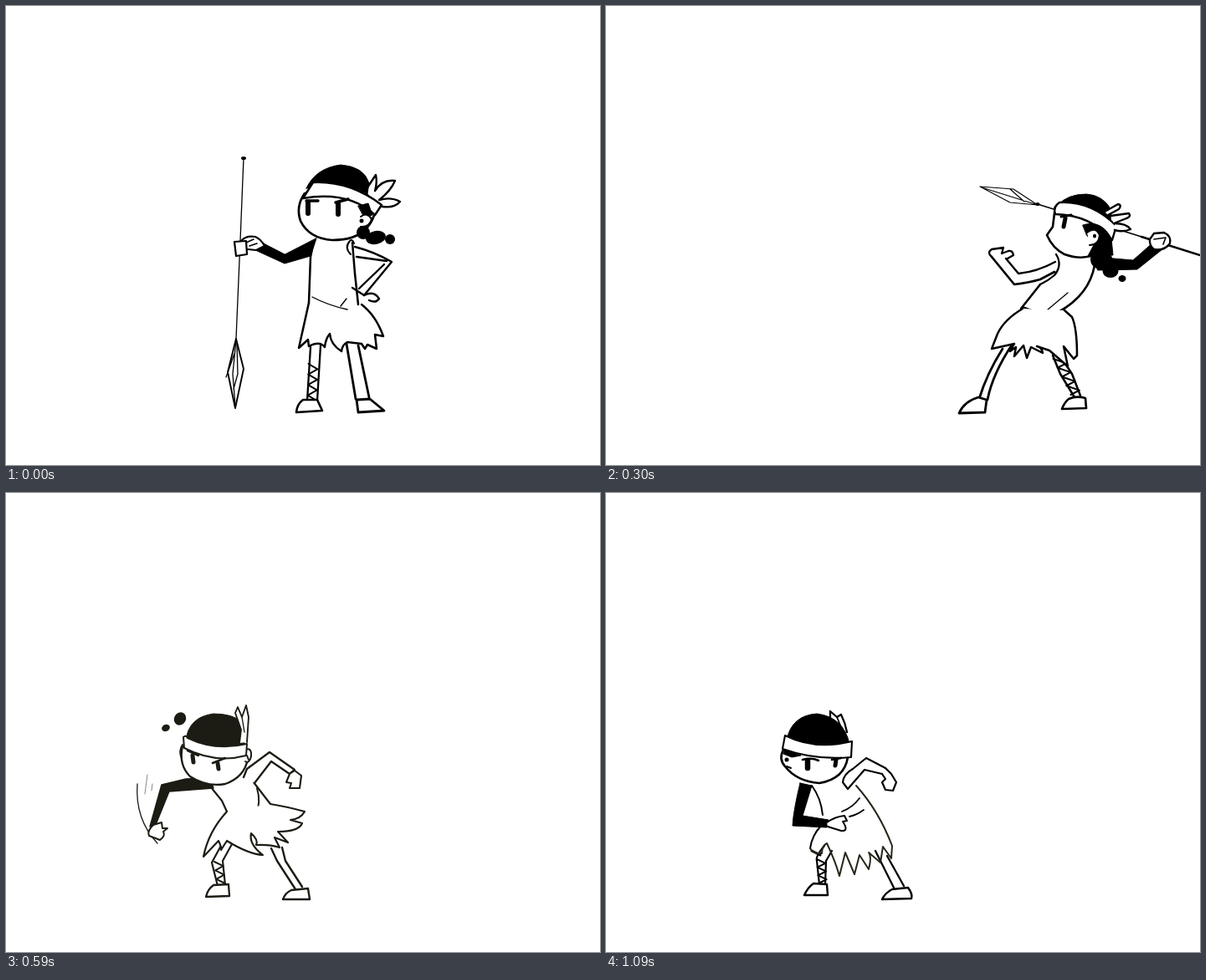
These frames come from a looping animation (710x549 px, 1.19 s). An HTML page with a canvas:

```html
<!DOCTYPE html>
<html lang="en">
<head>
<meta charset="utf-8">
<title>Spear throw</title>
<style>
html, body { margin: 0; width: 100%; height: 100%; overflow: hidden; background: #fff; }
canvas { display: block; }
</style>
</head>
<body>
<canvas id="stage" width="710" height="549"></canvas>
<script>
// Each line is "style data". Style is a line width plus w (white fill), k (ink fill),
// s (soft grey line) or g (olive line); o = ink ellipse, z = zigzag leg wrap.
const parts = {
  spear0: `1.3 M284 182L280 281L275 398
    o 284 182 3 2
    1.9 M275 398L265 438L274 481L284 434Z
    1.3 M275 400L271 440L274 478M263 444L273 416M276 404L277 440L272 458`,
  arm0: `1k M371 278L364 299L333 308L296 291L304 282L333 297Z
    2.2w M281 281Q287 274 298 276Q305 279 309 287L299 292L289 291
    2.2w M273 282L275 299L288 297L287 281Z
    1.6 M287 283L296 279M291 287L300 284`,
  head0: `2.7w M357 224Q346 240 352 257Q362 278 390 280Q418 280 431 266Q440 255 441 245L430 222Z
    1k M359 218Q370 194 400 190Q428 192 434 212L432 224Q400 209 359 218Z
    2.5w M367 211Q411 209 449 238L441 250Q410 221 355 230Z
    6 M361 235L361 248
    3.4 M359 233L373 233M394 235L409 231
    6 M397 236L397 249
    1k M421 239L433 236L438 250L428 252Z
    2w M424 252Q432 246 437 255Q434 265 424 264
    o 425 257 2.5 2.5
    o 427 271 8 8
    o 442 277 12 8 -.2
    o 459 279 6 6
    2.4 M432 217L442 202Q444 211 441 221Q450 207 465 209Q460 221 446 232Q460 228 471 234Q464 242 450 240`,
  body0: `2.5 M368 281L364 300L362 355M414 283L417 320L421 357
    2 M412 297Q404 289 411 281Q414 278 416 284
    2.4 M417 288Q440 294 461 306L428 346M419 300L455 305M452 309L422 338
    2.4 M414 337L428 346Q440 340 446 350Q442 356 434 352
    1.4 M366 348Q385 358 408 363M400 359L407 350
    2.5 M362 355L350 409L361 399L362 407Q375 400 381 408Q382 398 387 392Q388 405 401 413Q402 405 408 402L425 404L429 410L432 405L443 410L441 393L451 395Q442 370 425 357`,
  legs0: `2.3 M364 408L360 472M376 406L372 472
    z 367 428 366 472 11 7
    2.6w M355 471L372 471L378 484L347 486Q348 476 355 471Z
    2.8 M407 404L418 470M421 406L434 468
    2.8w M419 471L435 470L452 484L421 486Z`,

  spear1: `1.2 M470 178L309 327
    2 M470 178L463 185
    2 M309 327L283 341L263 373L297 350Z
    1.3 M309 327L263 373M283 341L297 350M290 339L293 348`,
  arm1: `1k M391 263L430 279L467 277L464 287L429 292L387 270Z
    2.1w M374 265L380 251L387 249Q396 254 394 262L388 271L382 266Z
    1.6 M383 251L380 262M388 252L385 264`,
  head1: `2.6w M460 223Q451 240 456 256Q466 276 494 279Q508 279 518 270L530 245Z
    1k M457 228Q464 203 495 200Q526 202 535 228L533 246Q510 222 457 228Z
    2.2w M464 221Q500 216 533 244L528 253Q500 231 461 230Z
    1k M455 231L468 232L461 238L460 246L454 246Z
    6 M487 240L486 252
    3 M483 237L502 238
    1k M500 238L530 252L528 270Q523 284 512 282Q504 276 511 264Q507 256 506 246Z
    1.5w M509 251Q516 243 522 252Q522 261 511 261Z
    o 515 254 2.2 2.2
    2.2w M520 231L537 220L538 228L525 236M526 236L549 223Q546 233 530 240M530 241L549 236L541 244L532 244
    o 528 289 12 8.5 -.4
    o 542 302 5 4.5`,
  body1: `2.4 M467 278Q441 310 440 348
    3.2 M495 306L489 366
    2 M496 298Q487 294 490 286Q494 281 501 285
    2.3 M500 285L531 325L528 364M496 297L523 327L519 363M523 327L531 322
    2 M518 363L528 364L527 382L515 384L517 377L509 377Q510 369 518 370
    2.2 M445 343L463 355
    1.3 M449 357Q470 364 490 361
    2 M440 348Q420 362 413 382L421 380L408 404Q420 388 427 391L426 398Q437 388 440 389Q447 396 446 410Q452 396 465 394L469 400Q482 396 487 405Q490 395 493 386L505 405Q502 393 510 393L494 370L487 363`,
  legs1: `2.2 M428 396L416 415L420 458M440 399L426 417L429 455
    z 421 415 425 455 10 7
    2.4w M420 456L430 459L428 465L405 473Q408 460 420 456Z
    2.6 M454 398L450 440L440 474M464 398L460 440L450 474
    2.5w M440 473L452 474L452 486L423 487Q427 478 440 473Z`,

  spearTurn: `1.6 M690 220L455 257
    1.6 M455 257L425 253L393 266L427 270ZM455 257L393 266`,
  armTurn: `10 M565 300L600 279L612 244
    2.2w M602 237L608 228L619 228Q625 235 620 244L606 246Z`,
  frontTurn: `2.2w M512 297L482 333L484 366L495 367L493 337L520 312Z
    2w M484 366L481 378L490 384L498 378L495 367Z`,
  legsTurn: `2.5 M460 408L453 440L441 473M474 405L463 442L451 473
    2.5w M440 473L452 474L452 486L423 487Q427 478 440 473Z
    2.2 M505 410L511 440L515 468M520 415L523 440L526 466
    z 517 420 520 464 11 7
    2.4w M513 468L526 467L529 478L505 481Z`,

  spear2: `1.1 M447 216L487 219L516 238L483 235ZM449 217L516 238M483 219L500 234
    1.5 M516 237L640 276
    2.6 M640 276L710 298
    o 516 237 2.5 2`,
  arm2: `1k M583 300L630 304L655 282L665 291L635 315L588 316Z
    2.3w M650 279L655 272L667 271Q676 275 674 284Q668 293 655 291Q649 286 650 279Z
    1.6 M655 279L669 277L666 285`,
  head2: `2.6w M537 240L534 264L527 274Q534 290 548 297Q568 304 582 298L606 270Z
    1k M540 238Q552 225 574 225Q594 226 604 244L603 258Q570 236 540 238Z
    2.4w M542 235Q580 233 610 263L605 280Q580 250 537 249Q534 240 542 235Z
    5 M549 254L547 264
    3 M544 252L556 250
    1k M570 262Q592 255 604 278L606 298L576 299L584 284L575 275Z
    2w M575 271Q585 263 590 274Q589 286 578 286
    o 584 275 2 2.5
    o 592 303 13 12
    o 603 317 9.5 8
    o 617 326 4.5 4
    2.4w M596 246L612 237Q617 238 613 243L600 250M603 251L625 248Q628 252 622 254L607 260M608 260Q622 260 627 267Q618 271 608 268`,
  torso2: `2.6 M519 333L496 362M584 310Q578 345 541 366
    2 M498 360Q520 369 541 369
    1.3 M527 364L552 343`,
  front2: `2.7 M461 300L488 333Q505 331 519 327L536 318
    2.4 M478 302L493 320Q515 318 537 306
    2.3 M461 300Q455 295 461 291L475 289L473 296L481 293Q486 292 487 298L480 302
    2.3 M538 297Q546 310 536 322Q528 329 519 333`,
  skirt2: `2.5w M498 362Q476 375 468 392L461 410L488 404L483 413L490 408L488 419L499 406L503 421L508 408L522 415Q521 408 515 407L530 412L552 431L547 407L559 422L563 418Q563 385 557 372L548 364`,
  legs2: `2.8 M474 410Q455 440 446 470M486 404Q462 440 456 471
    2.8w M445 468L455 471L453 486L422 487Q428 473 445 468Z
    2.5 M534 418L543 440L560 468M547 425L557 440L567 466
    z 541 422 562 465 13 8
    2.7w M553 470Q562 466 573 469L574 481L545 482Q548 474 553 470Z`,

  spearLunge: `1.5 M420 199L680 246
    1.7 M420 199L390 184L352 186L386 199ZM420 199L352 186`,
  armLunge: `10 M515 285L558 268L581 233
    2.2w M574 228L580 219L591 219Q598 225 593 235L580 237Z`,
  legsLunge: `2.5 M402 394Q404 435 408 472M420 394Q419 440 420 472
    2.5w M407 471L421 471L422 486L390 487Q396 475 407 471Z
    2.2 M462 402L478 430L502 464M476 406L490 428L510 460
    z 474 412 503 458 12 8
    2.4w M498 467L512 460L518 474L490 482Z`,

  speed3: `1.1 M325 163Q470 150 614 219M249 310Q275 277 372 273
    1s M522 298L589 331M553 197Q564 196 565 206M480 242Q520 212 556 203M395 465L430 468
    .8s M332 157L376 147M375 303Q430 298 481 306M400 428L461 438M362 197L385 198
    1.3 M414 155L491 155
    2 M260 168L295 153L327 164L290 168Z
    1.2 M260 168L327 163`,
  arm3: `1k M441 250L472 238L495 212L509 190L520 196L500 225L483 242L452 259Z
    o 477 232 9 12 .4
    o 501 226 6 6
    2.4w M507 178L512 171L518 175L531 176Q534 186 527 190L514 191Z`,
  head3: `2.6w M385 197Q376 212 383 230Q396 248 424 245L440 240L460 215Z
    1k M395 184Q404 167 430 165Q458 168 467 186L462 210Q430 180 395 184Z
    2w M384 197Q392 180 425 181Q455 186 470 210L463 234Q450 208 420 198Q400 191 384 197Z
    1.1s M385 198L408 199M395 195L410 182M430 202L436 183
    5 M408 205L408 214
    2.5 M403 204L411 202
    1k M433 206Q452 213 461 236L445 243L429 245L442 230Z
    2w M436 224Q446 214 453 222Q450 234 438 232M440 227L447 225
    2.4w M456 183L465 178L462 187L485 185Q480 195 468 197L488 200Q478 212 468 207`,
  body3: `2.3 M412 247L410 256M454 258Q454 290 427 318
    2.5w M383 305L404 262Q415 246 428 258L425 273L399 312
    2.4 M383 304L333 322M399 312Q380 320 338 328
    2.6 M333 322Q320 322 308 325L306 332L315 335L313 344L339 348L338 328L328 327L332 318M318 334L327 326
    1.9 M399 315L380 345M383 330Q405 335 425 322
    2.3 M383 320Q350 345 337 372Q370 372 384 380L398 376L410 380L455 387L440 356L460 367Q440 345 427 322
    1s M375 345L378 375M410 340L412 375M425 340L440 380M400 265L430 273`,
  legs3: `2.3 M370 366L361 388L387 428M383 380L380 390L398 420
    z 370 380 391 418 12 7
    2.4w M388 417L398 420L390 450Q382 440 388 417Z
    2.8 M398 380L406 405L418 455M410 380L418 405L428 455
    2.6w M416 454L428 454L428 471L401 470Q405 460 416 454Z`,

  spearAway: `1.4 M0 204Q70 185 205 183
    1.1s M40 220L135 206M70 176L190 172`,
  armAway: `9 M288 320L248 314L222 282
    2.2w M214 273L211 280L216 287L228 283L226 273L219 270Z
    1.2 M240 238Q205 255 198 300M252 246Q232 255 224 262`,

  swish4: `1.3 M157 348Q154 390 181 419
    1s M169 337L166 360M175 348L174 356`,
  arm4: `1.5k M244 341L215 342L186 349L172 399L178 399L195 357L248 353Z
    2w M176 397Q168 405 171 410L184 415Q191 410 188 405L193 401L187 401L186 394Z`,
  tail4: `o 208 270 7 8 .5
    o 191 281 5 4 -.4`,
  head4: `2.3w M211 303Q206 325 220 339Q240 352 262 348Q285 340 289 318L285 300Z
    2 M211 301Q206 308 210 318
    2w M286 307Q294 304 293 315Q291 324 286 321M288 314L290 319
    1k M215 296Q218 268 248 264Q272 264 283 275L285 302Q250 309 215 296Z
    2w M212 292Q215 289 217 293Q250 309 288 300L287 314Q250 324 213 305Z
    1.9w M279 299L281 283L274 263L277 256L282 268L287 254L290 268L288 298
    1.4 M282 268L285 286
    5 M223 314L224 322M253 323L254 330
    2.5 M217 308L230 314M247 323L262 317`,
  body4: `2.2 M241 347L258 368L264 381M296 346L316 372
    2 M269 385Q285 388 299 383Q305 370 300 353
    2.3w M284 340L288 330L315 310L345 331L339 336L317 321L297 347
    2.1w M345 332L353 338L351 353L339 353L341 347L335 346L339 336Z`,
  skirt4: `2.2w M264 381Q242 405 236 435L254 416Q258 424 257 427L264 416Q290 432 307 433Q290 420 293 407Q302 415 299 421Q315 420 327 424L321 412L337 418L325 405Q350 405 354 395L340 391Q352 390 357 381Q335 375 316 372`,
  legs4: `2.2 M258 420L246 442L253 470M270 420L259 440L262 469
    z 254 441 257 467 10 5
    2.3w M248 469L266 468L267 482L239 483Q241 474 248 469Z
    2.4 M317 425L324 440L346 474M330 424L334 440L354 471
    2.4w M341 475L361 473L363 486L331 486Q334 478 341 475Z`,

  armDrop: `1k M234 346L246 350L218 376L228 397L219 402L204 374Z
    2w M219 401L228 395L239 399L241 408L230 413L220 409Z`,
  arm5: `1k M232 347L246 350L235 386L266 391L264 400L223 398Q224 380 232 347Z
    2w M264 394Q274 387 285 386L288 392L283 393Q291 405 281 404L265 399`,
  tail5: `o 309 345 6.5 7
    o 323 339 3.5 3.5`,
  head5: `2.3w M268 276L268 261L276 268L281 265Q286 275 288 286
    1.8 M276 268L281 280
    2.6w M212 307Q206 318 214 327Q228 345 255 347Q285 342 289 316Z
    1k M216 295Q222 266 252 264Q284 268 291 300Q255 308 216 295Z
    2.1w M214 290Q250 308 294 297L293 316Q250 320 211 306Z
    1k M213 307L233 314L222 316L212 312Z
    o 216 319 2.5 2.5
    2 M216 327L221 329`,
  shut: `2 M236 327Q243 332 248 329M270 328L279 327
    1.3 M245 318L248 325M273 318L270 328`,
  open: `6.5 M241 320L241 329
    5 M275 319L274 326
    2.6 M235 319Q246 316 254 320M270 319L281 317`,
  body5: `2 M246 350Q257 365 259 385M257 398Q246 410 244 425
    1.8 M291 387Q300 385 308 379M282 381Q295 376 303 365
    2.2 M283 346Q284 336 295 330L311 317L334 329M283 346L289 354L309 331L330 336`,
  hand5: `2.2 M330 336L335 349M329 346L335 349L333 355L345 357L347 340L334 329`,
  hand6: `2.2 M330 336L334 342L330 346L334 355L343 356L347 346L341 336L334 329`,
  skirt5: `2g M299 350Q320 385 345 415L349 430M244 425Q248 432 258 431Q258 422 264 419Q274 432 277 447L285 428L295 452L301 431L310 447L320 425L334 440L340 421L347 434`,
  skirt6: `2g M299 350Q326 380 342 422L341 437M244 425Q248 432 258 431Q258 422 264 419Q274 440 279 458L286 430L297 456L303 433L314 450Q318 435 314 430L328 442L331 423L341 437`,
  legs5: `2.2 M261 422Q250 435 252 440L255 468M270 428L263 440L262 468
    3 M246 428L256 433
    z 257 438 259 467 10 6
    2.4w M248 467L264 468L265 481L237 481Q241 472 248 467Z
    2.3 M322 428L344 472M336 434L356 470
    2.5w M342 474L361 472Q367 480 365 485L330 486Q334 478 342 474Z`
};

const olive = "#1c1c14";
const crouch = "legs5 body5 arm5 head5";
// Start time, parts in paint order with optional "@dx,dy", ink
const poses = [
  [0, "spear0 legs0 body0 arm0 head0"],
  [100, "spear1 legs1 body1 arm1 head1"],
  [200, "armTurn spearTurn legsTurn torso2@-32,-6 skirt2@-27,-2 frontTurn head1@40,10"],
  [300, "spear2 arm2 legs2 torso2 skirt2 front2 head2"],
  [400, "armLunge spearLunge legsLunge torso2@-72,-22 skirt2@-72,-16 front2@-72,-22 head2@-75,-28"],
  [450, "speed3 arm3 legs3 body3 head3"],
  [510, "spearAway legs4@33,-2 body4@45,-25 skirt4@42,-18 armAway tail4@125,0 head4@45,-30", olive],
  [590, "swish4 legs4 body4 skirt4 arm4 tail4 head4", olive],
  [690, "legs5 body4 skirt4 armDrop tail4@-4,34 head5@0,-2 shut@0,-2", olive],
  [790, crouch + " hand5 skirt5 tail5@-3,-4 shut"],
  [890, crouch + " hand5 skirt5 tail5 shut"],
  [990, crouch + " hand6 skirt6 shut"],
  [1090, crouch + " hand6 skirt6 open"]
];
const loop = 1190;
const ctx = document.getElementById("stage").getContext("2d");

function ellipse(x, y, rx, ry, turn = 0) {
  const path = new Path2D();
  path.ellipse(x, y, rx, ry, turn, 0, Math.PI * 2);
  return path;
}

// Leg wrap running from one point to another, crossing the limb at each step
function wrap(x1, y1, x2, y2, width, steps) {
  const path = new Path2D();
  for (let i = 0; i <= steps; i++) {
    const k = i / steps, side = (i % 2 ? 0.5 : -0.5) * width;
    path.lineTo(x1 + (x2 - x1) * k + side, y1 + (y2 - y1) * k);
  }
  return path;
}

function drawLine(line, ink) {
  const [, style, data] = line.trim().match(/^(\S+) (.*)$/);
  const nums = data.split(" ").map(Number);
  ctx.strokeStyle = style.endsWith("s") ? "#888" : style.endsWith("g") ? "#26261a" : ink;
  ctx.fillStyle = style.endsWith("w") ? "#fff" : ink;
  if (style === "o") return ctx.fill(ellipse(...nums));
  const path = style === "z" ? wrap(...nums) : new Path2D(data);
  ctx.lineWidth = style === "z" ? 2 : parseFloat(style);
  if (/[wk]$/.test(style)) ctx.fill(path);
  ctx.stroke(path);
}

function drawPose([, list, ink = "#000"]) {
  ctx.fillStyle = "#fff";
  ctx.fillRect(0, 0, 710, 549);
  ctx.lineCap = ctx.lineJoin = "round";
  for (const item of list.split(" ")) {
    const [name, shift = "0,0"] = item.split("@");
    ctx.save();
    ctx.translate(...shift.split(",").map(Number));
    for (const line of parts[name].split("\n")) drawLine(line, ink);
    ctx.restore();
  }
}

function tick() {
  const t = performance.now() % loop;
  drawPose(poses.filter(([start]) => start <= t).pop());
  requestAnimationFrame(tick);
}
tick();
</script>
</body>
</html>
```
